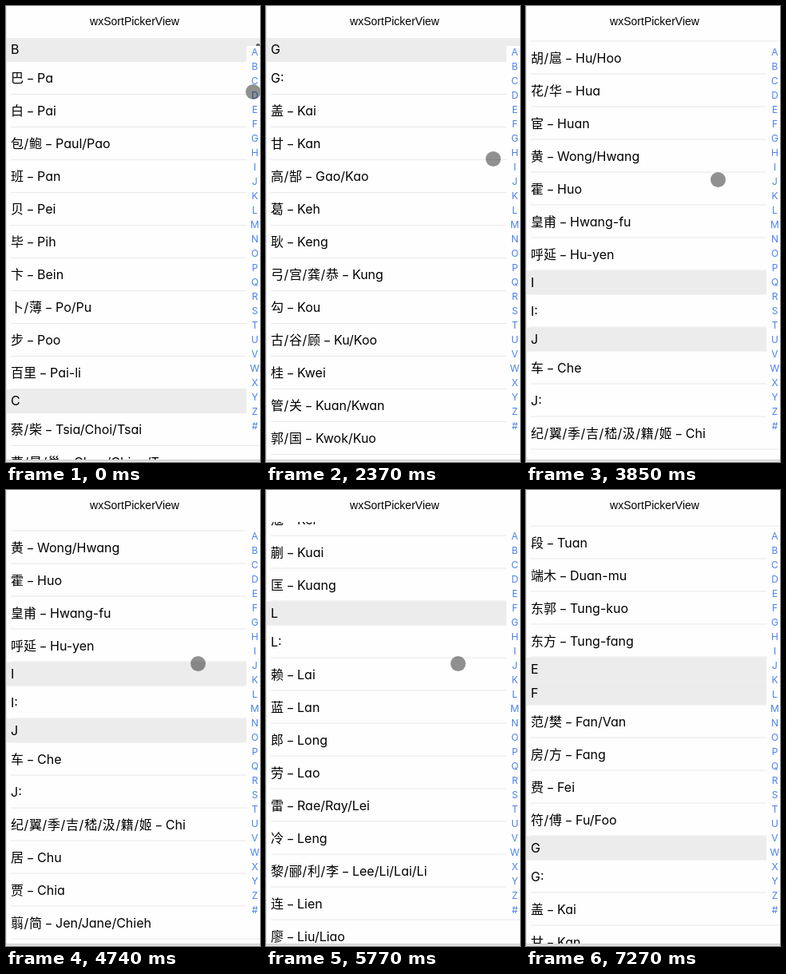
These frames come from a looping animation (318 by 571 pixels, 7870 ms). An HTML page:

```html
<!DOCTYPE html>
<html lang="zh">
<head>
<meta charset="utf-8">
<style>
html, body { margin: 0; width: 100%; height: 100%; overflow: hidden; background: #fefefe; }
body { position: relative; color: #000; font: 16px/40px Inter, "Noto Sans CJK SC", "Noto Sans CJK", sans-serif; font-feature-settings: "cv11"; }
body > * { position: absolute; }
#title { top: 0; left: 2px; width: 318px; text-align: center; font: 14px/39px "Liberation Sans", sans-serif; }
#view { left: 0; top: 40px; width: 318px; height: 528px; overflow: hidden; }
#list { position: absolute; top: 0; left: 0; width: 318px; }
h2 { margin: 0; height: 30px; padding-left: 6px; background: #ececec; font: inherit; line-height: 29px; }
p { margin: 0 0 0 6px; height: 40px; border-bottom: 1px solid #e9e9e9; white-space: nowrap; }
p:last-child { border-color: #ececec; }
p b { font-weight: 400; padding: 0 .6px; }
p i { font: 300 16px/0 "Noto Sans", sans-serif; }
#bar { left: 313px; top: 47px; width: 5px; height: 12px; border-radius: 3px; background: #666; }
#index { left: 301px; top: 50px; width: 17px; height: 485px; background: #fefefe; }
#index div { position: relative; top: -1px; left: 2px; width: 17px; height: 18px; color: #4c82ee; font-size: 12px; line-height: 18px; text-align: center; }
#left { left: 0; top: 0; width: 1px; height: 568px; background: #e4e4e4; }
#foot { left: 0; top: 568px; width: 318px; height: 3px; background: linear-gradient(#c8c8c8, #f0f0f0); }
#dot { left: -9.5px; top: -9.5px; width: 19px; height: 19px; border-radius: 50%; background: rgba(0, 0, 0, .43); }
</style>
</head>
<body>
<div id="title">wxSortPickerView</div>
<div id="view"><div id="list"></div></div>
<div id="bar"></div>
<div id="index"></div>
<div id="left"></div>
<div id="foot"></div>
<div id="dot"></div>
<script>
const sections = {
  B: '巴 Pa,白 Pai,包/鲍 Paul/Pao,班 Pan,贝 Pei,毕 Pih,卞 Bein,卜/薄 Po/Pu,步 Poo,百里 Pai-li',
  C: '蔡/柴 Tsia/Choi/Tsai,曹/晁/巢 Chao/Chiao/Tsao,岑 Cheng,崔 Tsui,查 Cha,常 Chiong,车 Che,陈 Chen/Chan/Tan,成/程 Cheng,池 Chi,褚/楚 Chu,淳于 Chwen-yu',
  D: '戴/代 Day/Tai,邓 Teng/Tang/Tung,狄 Ti,刁 Tiao,丁 Ting/T,董/东 Tung/Tong,窦 Tou,杜 To/Du/Too,段 Tuan,端木 Duan-mu,东郭 Tung-kuo,东方 Tung-fang',
  E: '',
  F: '范/樊 Fan/Van,房/方 Fang,费 Fei,符/傅 Fu/Foo',
  G: 'G:,盖 Kai,甘 Kan,高/郜 Gao/Kao,葛 Keh,耿 Keng,弓/宫/龚/恭 Kung,勾 Kou,古/谷/顾 Ku/Koo,桂 Kwei,管/关 Kuan/Kwan,郭/国 Kwok/Kuo,公孙 Kung-sun,公羊 Kung-yang,公冶 Kung-yeh',
  H: '海 Hay,韩 Hon/Han,杭 Hang,郝 Hoa/Howe,何/贺 Ho,桓 Won,侯 Hou,洪 Hong,胡/扈 Hu/Hoo,花/华 Hua,宦 Huan,黄 Wong/Hwang,霍 Huo,皇甫 Hwang-fu,呼延 Hu-yen',
  I: 'I:',
  J: '车 Che,J:,纪/翼/季/吉/嵇/汲/籍/姬 Chi,居 Chu,贾 Chia,翦/简 Jen/Jane/Chieh,蒋/姜/江 Chiang/Kwong,焦 Chiao,金/靳 Jin/King,京/荆 King/Ching,讦 Gan',
  K: '阚 Kan,康 Kang,柯 Kor/Ko,孔 Kong/Kung,寇 Ker,蒯 Kuai,匡 Kuang',
  L: 'L:,赖 Lai,蓝 Lan,郎 Long,劳 Lao,雷 Rae/Ray/Lei,冷 Leng,黎/郦/利/李 Lee/Li/Lai/Li,连 Lien,廖 Liu/Liao,梁 Leung/Liang,林/蔺 Lim/Lin,凌 Lin,柳/刘 Liu/Lau'
};
const $ = id => document.getElementById(id);
// Slashes between Chinese characters get a little more room
const row = text => '<p>' + text.replace(/\/(?=\W)/g, '<b>/</b>').replace(' ', ' <i>–</i> ') + '</p>';

const tops = {};
let height = 0;
$('list').innerHTML = Object.entries(sections).map(([letter, names]) => {
  const rows = names ? names.split(',') : [];
  tops[letter] = height;
  height += 30 + 41 * rows.length;
  return `<section><h2>${letter}</h2>${rows.map(row).join('')}</section>`;
}).join('');
$('index').innerHTML = [...'ABCDEFGHIJKLMNOPQRSTUVWXYZ#'].map(c => `<div>${c}</div>`).join('');

const LOOP = 7870, TICK = 148.1;
const clamp = u => Math.min(1, Math.max(0, u));
const smooth = u => u * u * (3 - 2 * u);
const lerp = (a, b, u) => a + (b - a) * u;

// List position, measured from the G heading
function scrollAt(n) {
  if (n < 16) {
    const letter = n < 5 ? 'B' : n < 6 ? 'C' : n < 10 ? 'D' : n < 12 ? 'E' : 'F';
    return tops[letter] - tops.G;
  }
  if (n < 32) return lerp(0, 1114.5, smooth(clamp((n - 18) / 10)));
  if (n < 39) return lerp(1114.5, 2059.5, smooth((n - 32) / 7));
  return lerp(2059.5, -393.5, 1 - (1 - clamp((n - 39) / 10)) ** 4.463);
}

// Pointer keys: tick, x, y
const path = [[0, 309, 107], [3, 309.5, 112], [9, 309.5, 112], [13, 309.5, 166], [15, 309.5, 166],
  [16, 284, 191], [17, 240, 217], [46, 240, 217], [49, 250, 600], [60, 250, 600]];
function pointerAt(n) {
  const i = path.findIndex(k => k[0] > n);
  const a = path[i - 1], b = path[i], u = (n - a[0]) / (b[0] - a[0]);
  return [lerp(a[1], b[1], u), lerp(a[2], b[2], u)];
}

function draw(now) {
  const n = Math.floor((now % LOOP + 10) / TICK);
  const [x, y] = pointerAt(n);
  // The list scrolls in half pixels
  const top = Math.round(2 * (tops.G + scrollAt(n))) / 2;
  $('list').style.transform = `translateY(${-top}px)`;
  $('dot').style.transform = `translate(${x}px, ${y}px)`;
  $('bar').style.opacity = clamp(1 - n / 3);
  requestAnimationFrame(draw);
}
draw(performance.now());
</script>
</body>
</html>
```
